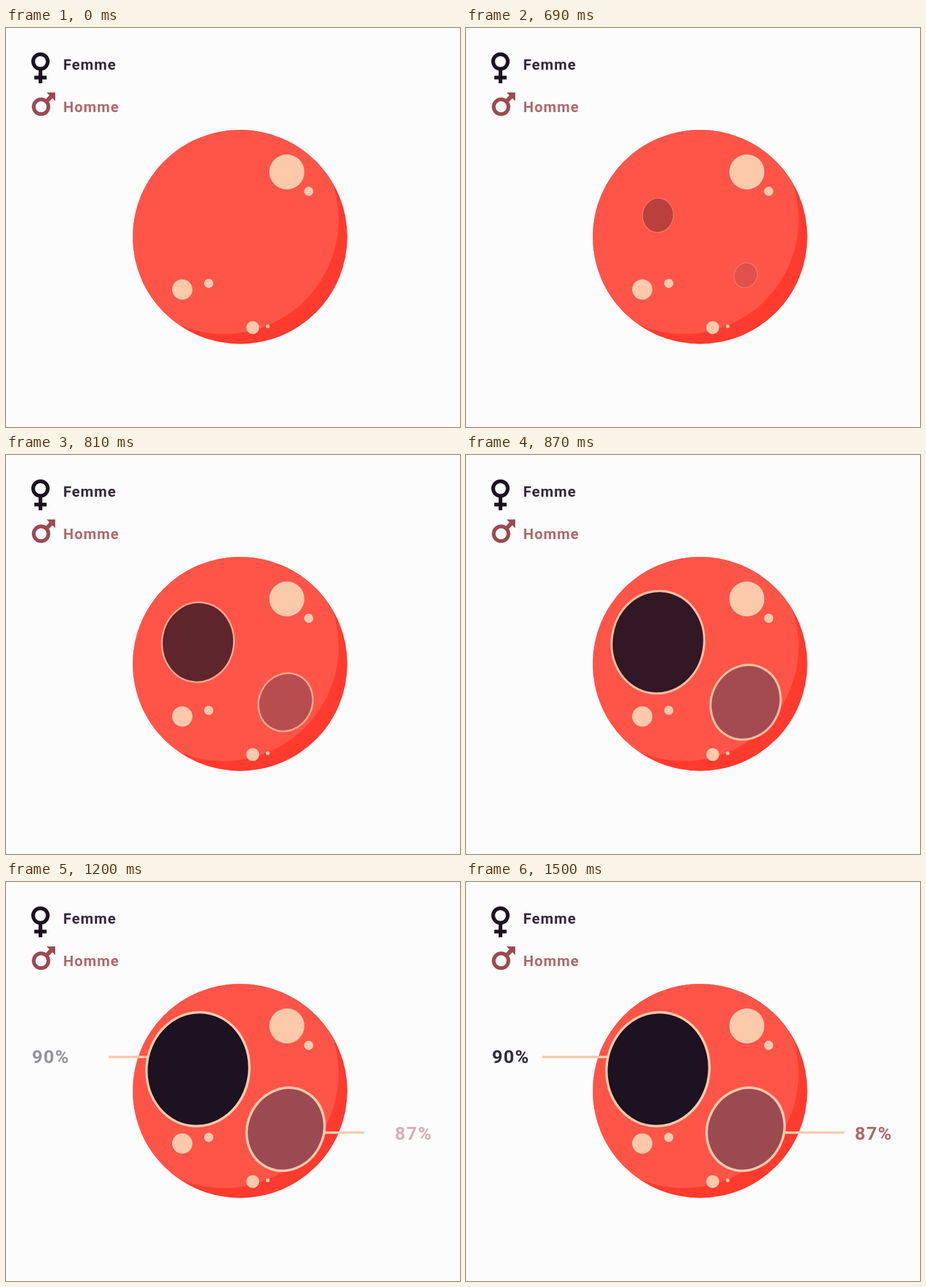
Recreate the animation shown at these times as an HTML page. Size 738x650 px, loop 2.7 s.

```html
<!DOCTYPE html>
<html lang="fr">
<head>
<meta charset="utf-8">
<style>
  html, body { margin: 0; width: 100%; height: 100%; overflow: hidden; background: #fcfcfc; }
  svg { display: block; }
  text { font: 700 24px Roboto, sans-serif; letter-spacing: .05em; }
  .value { font-size: 30px; }
  .woman { fill: #342a3b; }
  .man { fill: #b0686d; }
  .peach { fill: #fccaab; }
  .hole, .link { stroke: #fccaab; stroke-width: 4; }
</style>
</head>
<body>
<svg width="738" height="650" viewBox="0 0 738 650">
  <clipPath id="disc"><circle cx="380.4" cy="340.3" r="174.4"/></clipPath>

  <g fill="none" stroke="#1c1221" stroke-width="6">
    <circle cx="56" cy="54.6" r="11.9"/>
    <path d="M56 67V90M46 80.7H66"/>
  </g>
  <circle cx="57" cy="128.3" r="12" fill="none" stroke="#9b4a52" stroke-width="6"/>
  <path d="M66 105H80V119L75.5 114.5 67.5 122.5 63 118 70.5 109.5Z" fill="#9b4a52"/>
  <text class="woman" x="93" y="68">Femme</text>
  <text class="man" x="93" y="137">Homme</text>

  <circle cx="380.4" cy="340.3" r="174.4" fill="#ff3b2f"/>
  <circle cx="354" cy="312" r="186.5" fill="#ff5549" clip-path="url(#disc)"/>
  <g class="peach">
    <circle cx="456.5" cy="234.5" r="28.5"/>
    <circle cx="492" cy="266" r="7.5"/>
    <circle cx="286.5" cy="426" r="16.5"/>
    <circle cx="329.5" cy="416" r="7.5"/>
    <circle cx="401" cy="488" r="10.5"/>
    <circle cx="425.5" cy="486" r="3"/>
  </g>

  <path class="link" id="left"/>
  <path class="link" id="right"/>
  <g class="hole" data-at="312 305"><ellipse rx="83.5" ry="93" transform="rotate(8)" fill="#1c1221"/></g>
  <g class="hole" data-at="454.5 402.8"><ellipse rx="61.8" ry="68.9" transform="rotate(27)" fill="#9b4a52"/></g>

  <text class="woman value" x="42.3" y="295">90%</text>
  <text class="man value" x="632" y="419.5">87%</text>
</svg>
<script>
const LOOP = 2700, STEP = 30;
const all = s => document.querySelectorAll(s);
const holes = all('.hole'), values = all('.value');
const left = document.getElementById('left'), right = document.getElementById('right');
const progress = (t, start, length) => Math.min(1, Math.max(0, (t - start) / length));

// cubic-bezier(0, 0, .58, 1)
function easeOut(x) {
  let lo = 0, hi = 1;
  for (let i = 0; i < 24; i++) {
    const s = (lo + hi) / 2;
    if (1.74 * s * s - .74 * s ** 3 < x) lo = s; else hi = s;
  }
  return 3 * lo * lo - 2 * lo ** 3;
}

function draw(t) {
  const grow = progress(t, 600, 300), show = progress(t, 900, 600), reach = easeOut(show);
  for (const hole of holes) {
    hole.setAttribute('transform', `translate(${hole.dataset.at}) scale(${grow})`);
    hole.setAttribute('opacity', grow);
  }
  for (const value of values) value.setAttribute('opacity', show);
  left.setAttribute('d', show ? `M260 285h${-136 * reach}` : '');
  right.setAttribute('d', show ? `M511 408.2h${104 * reach}` : '');
}

const begin = performance.now();
function frame() {
  const t = (performance.now() - begin) % LOOP;
  draw(Math.floor(t / STEP) * STEP);
  requestAnimationFrame(frame);
}
frame();
</script>
</body>
</html>
```
